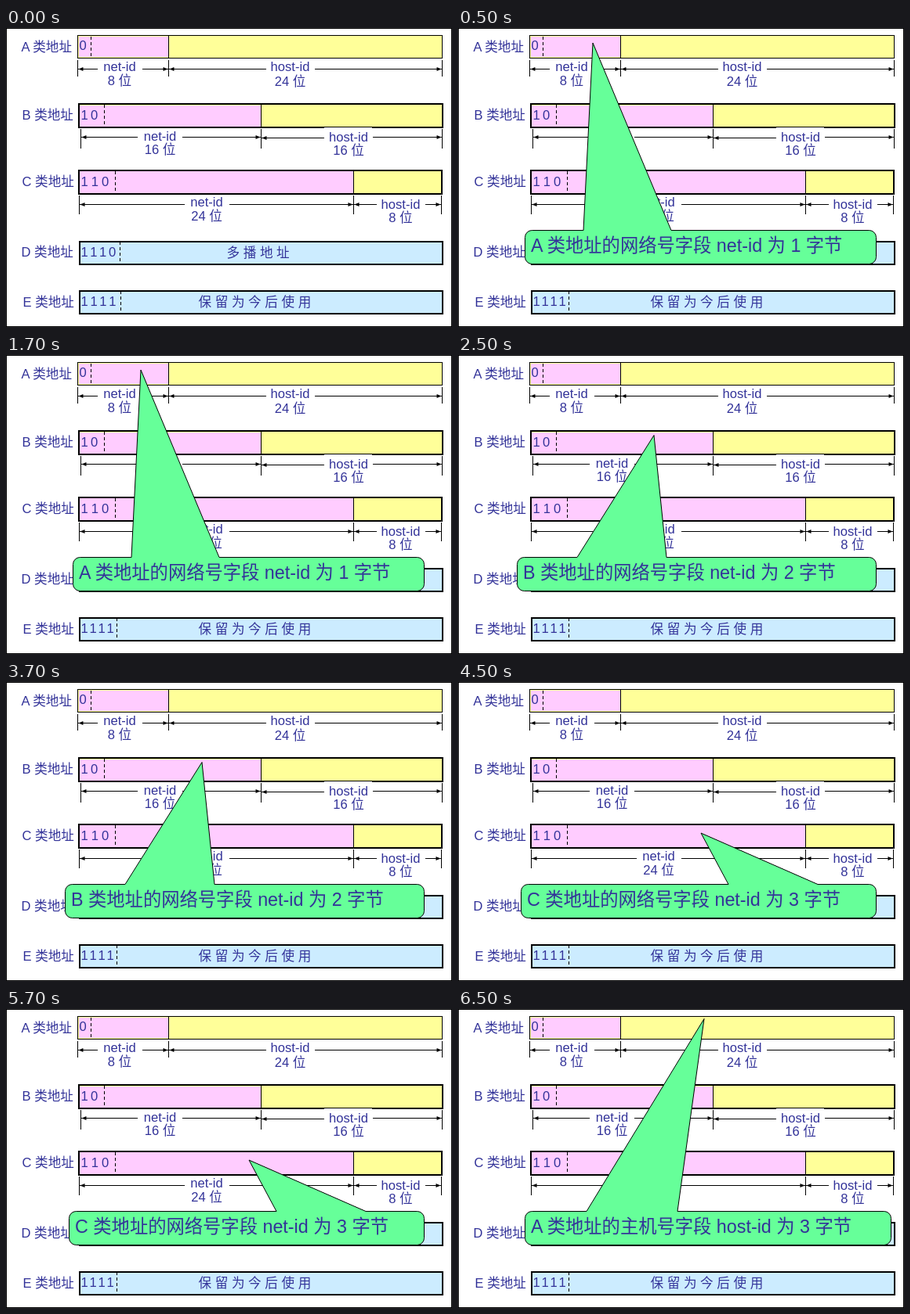
These frames come from a looping animation (569x382 px, 8 s). An HTML page:

```html
<!DOCTYPE html>
<html lang="zh-CN">
<head>
<meta charset="utf-8">
<title>IP 地址分类</title>
<style>
html, body { margin: 0; width: 100%; height: 100%; overflow: hidden; background: #fff; }
svg { display: block; width: 569px; height: 382px; }
text { font: 16.6px "Liberation Sans", Arial, "Noto Sans CJK SC", "Noto Sans CJK", sans-serif; fill: #339; white-space: pre; }
.mid { text-anchor: middle; }
.line { stroke: #000; fill: none; shape-rendering: crispEdges; }
.dash { stroke-dasharray: 4 3; }
.fill { shape-rendering: crispEdges; }
.note path { fill: #6f9; stroke: #000; stroke-width: 1; }
.note text { font-size: 23.3px; }
.step { visibility: hidden; animation: 8s step-end infinite; }
#wide { animation-name: wide; }
#narrow { animation-name: narrow; }
#note0 { animation-name: note0; }
#note1 { animation-name: note1; }
#note2 { animation-name: note2; }
#note3 { animation-name: note3; }
@keyframes wide { 0% { visibility: visible } 6.25%, 100% { visibility: hidden } }
@keyframes narrow { 0% { visibility: hidden } 6.25%, 100% { visibility: visible } }
@keyframes note0 { 0% { visibility: hidden } 6.25% { visibility: visible } 31.25%, 100% { visibility: hidden } }
@keyframes note1 { 0% { visibility: hidden } 31.25% { visibility: visible } 56.25%, 100% { visibility: hidden } }
@keyframes note2 { 0% { visibility: hidden } 56.25% { visibility: visible } 81.25%, 100% { visibility: hidden } }
@keyframes note3 { 0% { visibility: hidden } 81.25%, 100% { visibility: visible } }
</style>
</head>
<body>
<svg id="stage" viewBox="0 0 569 382"></svg>
<script>
const PINK = '#fcf', YELLOW = '#ff9', BLUE = '#ccecff';

const rect = (x, y, w, h, color) =>
  `<rect class="fill" x="${x}" y="${y}" width="${w}" height="${h}" fill="${color}"/>`;
const line = (x1, y1, x2, y2, cls = '') =>
  `<path class="line ${cls}" d="M${x1} ${y1}L${x2} ${y2}"/>`;
const text = (x, y, str, cls = '') => `<text class="${cls}" x="${x}" y="${y}">${str}</text>`;
const frame = (x, y, w, h, weight) =>
  `<rect class="line" x="${x}" y="${y}" width="${w}" height="${h}" stroke-width="${weight}"/>`;

// Leading bits, one digit every `pitch` pixels, then the dashed divider
function bits(str, y, pitch, divider) {
  const xs = [...str].map((_, i) => 95.5 + i * pitch).join(' ');
  return text(xs, y + 20, str) + line(divider + .5, y + 1, divider + .5, y + 29, 'dash');
}

// Double-headed measure with a gap for its caption; the right half may sit at another height
function measure(x1, x2, y, mid, name, nameY, size, sizeY, y2 = y) {
  const half = name === 'net-id' ? 28.5 : 31;
  const head = (x, y, dir) => `<path d="M${x} ${y}l${6 * dir}-2.5v5z"/>`;
  return line(x1, y, mid - half, y) + line(mid + half, y2, x2, y2) +
    head(x1 + .5, y, 1) + head(x2 - .5, y2, -1) +
    text(mid, nameY, name, 'mid') + text(mid, sizeY, size + ' 位', 'mid');
}

const ticks = (y1, y2, ...xs) => xs.map(x => line(x + .5, y1, x + .5, y2)).join('');

function note(i, left, right, apexX, apexY, baseL, baseR, textX, str) {
  const t = 258.5, b = 301.5, r = 9;
  return `<g class="note step" id="note${i}"><path d="M${left + r} ${t}H${baseL}L${apexX} ${apexY}L${baseR} ${t}` +
    `H${right - r}a${r} ${r} 0 0 1 ${r} ${r}V${b - r}a${r} ${r} 0 0 1 ${-r} ${r}` +
    `H${left + r}a${r} ${r} 0 0 1 ${-r} ${-r}V${t + r}a${r} ${r} 0 0 1 ${r} ${-r}z"/>` +
    text(textX, 286, str) + '</g>';
}

const labels = [['A', 19.5, 30], ['B', 20.5, 117], ['C', 20.5, 202], ['D', 19.5, 292], ['E', 21.5, 356]]
  .map(([c, x, y]) => text(x, y, c + ' 类地址')).join('');

const rowA = rect(91, 10, 465, 28, YELLOW) + rect(93, 11, 114, 26, PINK) + frame(91.5, 9.5, 465, 29, 1) +
  line(207.5, 10, 207.5, 38) + text(93.5, 28, '0') + line(108.5, 11, 108.5, 38, 'dash') +
  ticks(41, 62, 91, 207, 556) +
  measure(92, 207, 52.5, 145, 'net-id', 54.5, 8, 73) +
  measure(208, 556, 52.5, 362.5, 'host-id', 55, 24, 74);

const rowB = rect(94, 98, 462, 28, YELLOW) + rect(94, 99, 231, 27, PINK) + frame(93, 97, 464, 30, 2) +
  rect(406, 127, 61, 4, '#fff') +
  line(325.5, 98, 325.5, 126) + bits('10', 97, 12.5, 125) + ticks(129, 154, 95, 325, 556) +
  measure(96, 325, 139.5, 196.5, 'net-id', 144, 16, 161) +
  measure(326, 556, 140.5, 437, 'host-id', 144.5, 16, 162, 139.5);

const rowC = rect(94, 183, 349, 28, PINK) + rect(443, 183, 112, 28, YELLOW) + frame(93, 182, 463, 30, 2) +
  line(443.5, 183, 443.5, 211) + bits('110', 182, 13.2, 139) + ticks(214, 238, 93, 443, 555) +
  measure(94, 443, 225.5, 256, 'net-id', 228, 24, 245.5) +
  measure(444, 555, 225.5, 503.5, 'host-id', 231, 8, 248);

const rowD = rect(94, 273, 462, 28, BLUE) + frame(94, 273, 463, 29, 2) +
  bits('1110', 272, 11.8, 145) + text(281.5, 293, '多 播 地 址');

const rowE = rect(94, 336, 462, 28, BLUE) + frame(94, 336, 463, 29, 2) +
  `<g class="step" id="wide">${bits('1111', 335, 11.9, 146)}</g>` +
  `<g class="step" id="narrow">${bits('1111', 335, 11, 141)}</g>` +
  text(245.5, 356, '保 留 为 今 后 使 用');

document.getElementById('stage').innerHTML =
  frame(.5, .5, 568, 381, 1) + labels + rowA + rowB + rowC + rowD + rowE +
  note(0, 85.5, 533.5, 172, 19, 160, 272, 93, 'A 类地址的网络号字段 net-id 为 1 字节') +
  note(1, 75.5, 533.5, 250, 102.5, 152, 266, 83, 'B 类地址的网络号字段 net-id 为 2 字节') +
  note(2, 80.5, 533.5, 310, 193, 345, 459, 88, 'C 类地址的网络号字段 net-id 为 3 字节') +
  note(3, 85.5, 552.5, 314, 12.5, 164, 280, 93, 'A 类地址的主机号字段 host-id 为 3 字节');
</script>
</body>
</html>
```
